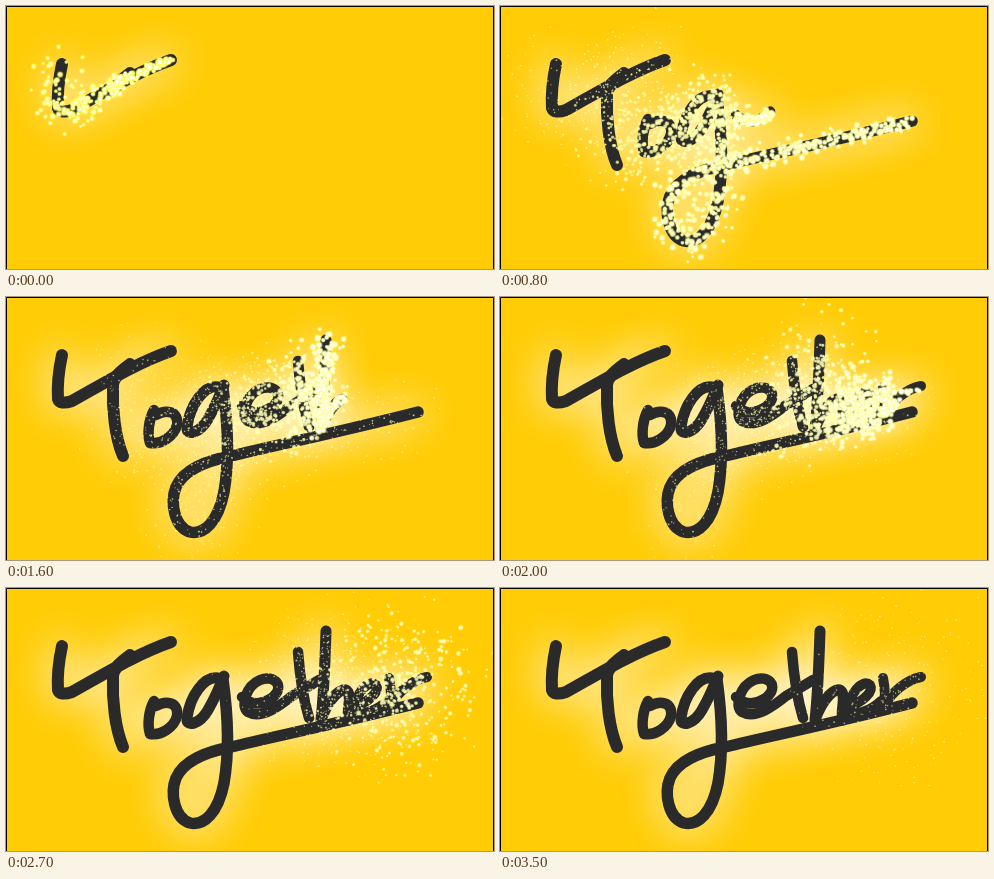
Animation of 488x263 px, one loop 3.6 s. Source, as an HTML page with a canvas:

```html
<!DOCTYPE html>
<html lang="en">
<head>
<meta charset="utf-8">
<title>Together</title>
<style>
html, body { margin: 0; width: 100%; height: 100%; overflow: hidden; background: #ffcc05; }
svg, canvas { position: absolute; left: 0; top: 0; width: 488px; height: 263px; }
path { fill: none; stroke-linecap: round; stroke-linejoin: round; }
#ink path { stroke: #2a2a2a; }
#glow path { stroke: #fff; stroke-width: 14px; }
</style>
</head>
<body>
<svg viewBox="0 0 488 263" role="img" aria-label="Together">
  <defs>
    <filter id="soft" filterUnits="userSpaceOnUse" x="-80" y="-80" width="648" height="423" color-interpolation-filters="sRGB">
      <feGaussianBlur stdDeviation="20"/>
    </filter>
  </defs>
  <rect width="488" height="263" fill="#ffcc05"/>
  <g id="glow" filter="url(#soft)"></g>
  <!-- from/to: drawing time in ms; density: sparkles per pixel; reach: how far they fly -->
  <g id="ink">
    <path data-from="-380" data-to="0" data-density="1.3" data-reach="60" stroke-width="12" d="M56 58C53 72 51 86 52 102Q54 108 66 104C95 88 130 66 165 54"/>
    <path data-from="-50" data-to="150" data-density="1.4" data-reach="56" stroke-width="12" d="M124 67C118 72 108 78 107 88C106 112 109 140 117 159"/>
    <path data-from="170" data-to="280" data-density="1.8" data-reach="56" stroke-width="10.5" d="M148 113C143 122 141 136 144 146C154 148 168 140 171 128C173 114 160 112 150 118"/>
    <path data-from="290" data-to="390" data-density="1.9" data-reach="60" stroke-width="11" d="M212 90C198 88 184 108 181 130C180 140 194 136 202 122C210 108 214 98 218 88"/>
    <path data-from="400" data-to="690" data-density="1.1" data-reach="46" stroke-width="11.5" d="M217 92C221 120 224 160 218 195C212 225 198 238 184 235C168 230 164 205 170 190C178 172 200 164 225 159C270 148 330 136 412 115"/>
    <path data-from="710" data-to="1150" data-density="2.6" data-reach="58" stroke-width="10.5" d="M236 109Q249 121 266 110C280 98 268 86 254 92C240 98 234 118 242 124C256 132 276 116 286 108Q300 100 313 92"/>
    <path data-from="1180" data-to="1380" data-density="2" data-reach="60" stroke-width="10.5" d="M292 64C294 90 297 110 303 130"/>
    <path data-from="1420" data-to="1650" data-density="1.9" data-reach="74" stroke-width="11" d="M320 43C319 75 318 105 315 132C322 112 336 96 342 104C346 112 340 122 343 132"/>
    <path data-from="1680" data-to="1830" data-density="3" data-reach="80" stroke-width="10" d="M350 118C362 114 374 104 370 97C362 90 348 108 350 120C354 130 372 122 382 112"/>
    <path data-from="1850" data-to="2000" data-density="5" data-reach="100" data-linger="320" stroke-width="10" d="M383 90C385 100 386 108 384 118C392 104 406 92 421 89"/>
  </g>
</svg>
<canvas id="sparks" width="488" height="263"></canvas>
<svg viewBox="0 0 488 263" aria-hidden="true"><path d="M.5 263V.5H487.5V263" stroke="#000"/></svg>
<script>
const LOOP = 3600, STEP = 100;
const ctx = document.getElementById('sparks').getContext('2d');
const glow = document.getElementById('glow');

let seed = 20;
function random() {
  seed = (seed * 1664525 + 1013904223) >>> 0;
  return seed / 4294967296;
}

// Each stroke has a blurred copy that lights up the ground behind it.
const strokes = [...document.querySelectorAll('#ink path')].map(el => {
  const { from, to, density, reach, linger = 0 } = el.dataset;
  const light = glow.appendChild(el.cloneNode());
  return {
    el, paths: [el, light], length: el.getTotalLength(),
    from: +from, to: +to, density: +density, reach: +reach, linger: +linger
  };
});

function makeSpark(s) {
  const u = random();
  const p = s.el.getPointAtLength(u * s.length);
  const angle = random() * Math.PI * 2;
  return {
    x: p.x + (random() - .5) * 8,
    y: p.y + (random() - .5) * 8,
    dx: Math.cos(angle), dy: Math.sin(angle),
    reach: s.reach * random(),
    born: s.from + (s.to - s.from) * u + s.linger * random(),
    life: 1300 + 500 * random(),
    size: 1.5 + 1.5 * random()
  };
}

const sparks = strokes.flatMap(s =>
  Array.from({ length: Math.round(s.length * s.density) }, () => makeSpark(s)));

function drawStrokes(t) {
  for (const { paths, length, from, to } of strokes) {
    const k = Math.min(1, Math.max(0, (t - from) / (to - from)));
    for (const { style } of paths) {
      style.visibility = k > 0 ? 'visible' : 'hidden';
      style.strokeDasharray = k < 1 ? `${length * k} ${length * 2}` : 'none';
    }
  }
}

function dot(x, y, r, color) {
  ctx.fillStyle = color;
  ctx.beginPath();
  ctx.arc(x, y, r, 0, Math.PI * 2);
  ctx.fill();
}

function drawSparks(t) {
  ctx.clearRect(0, 0, 488, 263);
  const blue = Math.round(Math.min(160, 80 + t * .08));
  for (const p of sparks) {
    const age = t - p.born;
    if (age < 0 || age > p.life) continue;
    const far = p.reach * (1 - Math.exp(-Math.pow(age / 430, 1.5)));
    const x = p.x + p.dx * far, y = p.y + p.dy * far;
    const r = p.size * Math.max(.28, 1 - Math.pow(age / 1000, 2));
    const left = 1 - age / p.life;
    dot(x, y, r * 1.3, `rgba(255,255,${blue},${.15 + .25 * left})`);
    dot(x, y, r, `rgba(255,255,${blue},${.4 + .4 * left})`);
    dot(x, y, r * .75, `rgba(255,255,255,${Math.max(.25, 1 - age / 900)})`);
  }
}

let shown = -1;
function frame() {
  const t = Math.floor(performance.now() % LOOP / STEP) * STEP;
  if (t !== shown) {
    shown = t;
    drawStrokes(t);
    drawSparks(t);
  }
  requestAnimationFrame(frame);
}
frame();
</script>
</body>
</html>
```
